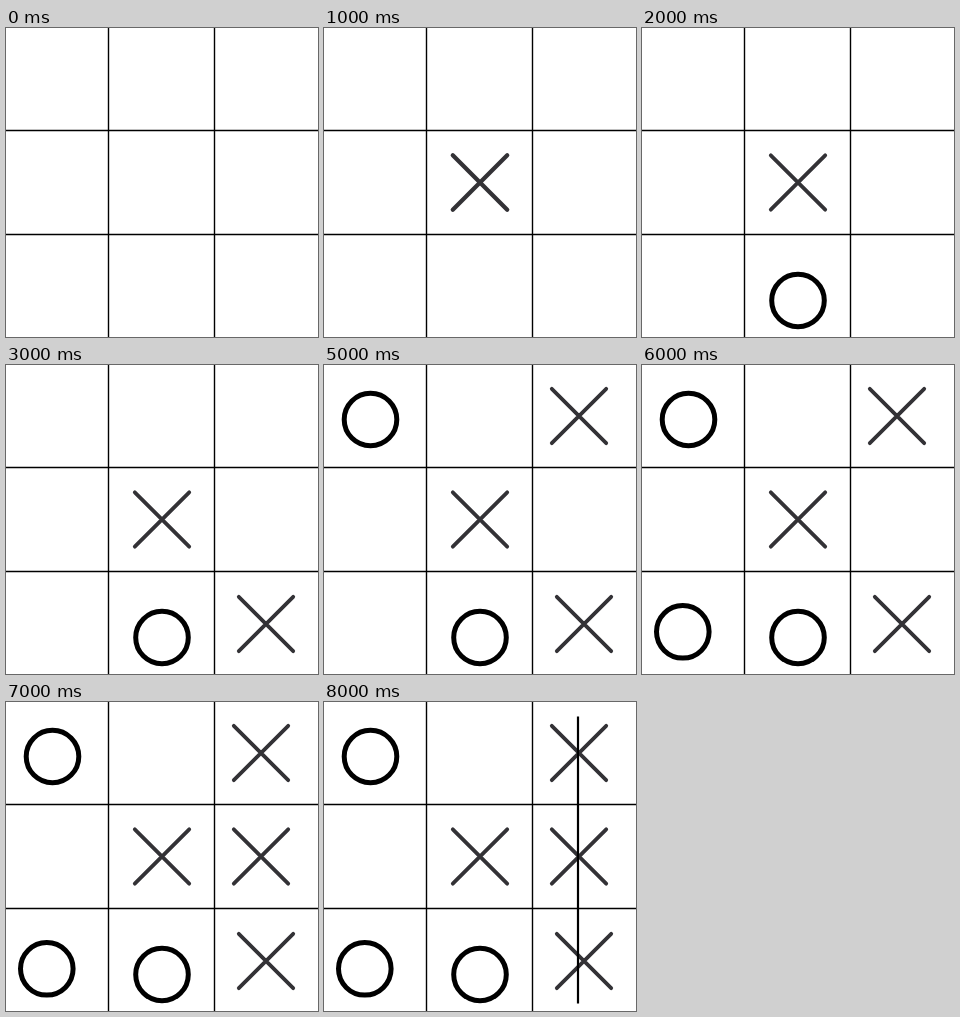
Recreate the animation shown at these times as an HTML page. Size 312 by 309 pixels, loop 9 s.

```html
<!DOCTYPE html>
<html lang="en">
<head>
<meta charset="utf-8">
<title>Tic-tac-toe</title>
<style>
  html, body { margin: 0; width: 100%; height: 100%; overflow: hidden; background: #fff; }
  svg { display: block; width: 312px; height: 309px; }
  .grid { stroke: #000; stroke-width: 1.4; }
  .x { fill: none; stroke: #333236; stroke-width: 3.8; stroke-linecap: round; }
  .bold { stroke-width: 4.3; }
  .o { fill: none; stroke: #000; stroke-width: 5; }
  .win { stroke: #000; stroke-width: 2.2; }

  /* Each move appears on its own second and stays until the loop restarts. */
  .move { visibility: hidden; animation: 9s step-end infinite; }
  .m1 { animation-name: m1; }
  .m2 { animation-name: m2; }
  .m3 { animation-name: m3; }
  .m4 { animation-name: m4; }
  .m5 { animation-name: m5; }
  .m6 { animation-name: m6; }
  .m7 { animation-name: m7; }
  .m8 { animation-name: m8; }
  .first { animation-name: first; }
  @keyframes first { 0% { visibility: hidden } 11.111% { visibility: visible } 22.222%, 100% { visibility: hidden } }
  @keyframes m2 { 0% { visibility: hidden } 22.222%, 100% { visibility: visible } }
  @keyframes m3 { 0% { visibility: hidden } 33.333%, 100% { visibility: visible } }
  @keyframes m4 { 0% { visibility: hidden } 44.444%, 100% { visibility: visible } }
  @keyframes m5 { 0% { visibility: hidden } 55.555%, 100% { visibility: visible } }
  @keyframes m6 { 0% { visibility: hidden } 66.666%, 100% { visibility: visible } }
  @keyframes m7 { 0% { visibility: hidden } 77.777%, 100% { visibility: visible } }
  @keyframes m8 { 0% { visibility: hidden } 88.888%, 100% { visibility: visible } }
</style>
</head>
<body>
<svg viewBox="0 0 312 309">
  <defs>
    <path id="cross" d="M-27.2-27.2 27.2 27.2M27.2-27.2-27.2 27.2"/>
    <circle id="ring" r="26.3"/>
  </defs>
  <path class="grid" d="M102.5 0V309M208.5 0V309M0 102.5H312M0 206.5H312"/>
  <use class="x bold move first" href="#cross" x="156" y="154.5"/>
  <use class="x move m2" href="#cross" x="156" y="154.5"/>
  <use class="o move m2" href="#ring" x="156" y="272.5"/>
  <use class="x move m3" href="#cross" x="260" y="259"/>
  <use class="o move m4" href="#ring" x="46.5" y="54.5"/>
  <use class="x move m5" href="#cross" x="255" y="51"/>
  <use class="o move m6" href="#ring" x="40.8" y="266.8"/>
  <use class="x move m7" href="#cross" x="255" y="154.5"/>
  <path class="win move m8" d="M254 14.5V301.5"/>
</svg>
</body>
</html>
```
